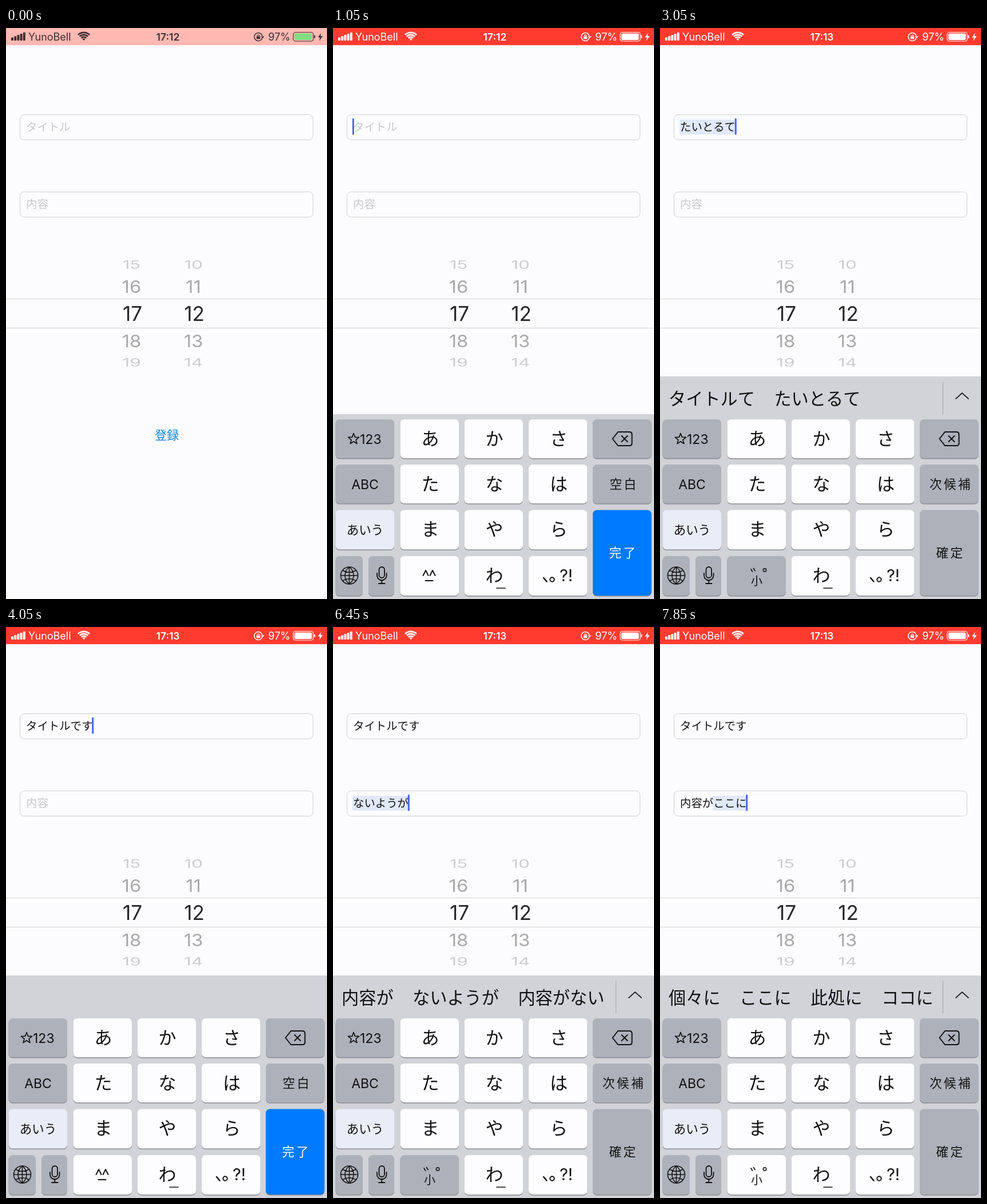
These frames come from a looping animation (561x998 px, 8 s). An HTML page with a canvas:

```html
<!DOCTYPE html>
<html lang="ja">
<head>
<meta charset="utf-8">
<title>入力フォーム</title>
<style>
html, body { margin: 0; width: 100%; height: 100%; overflow: hidden; background: #fcfcfe; }
canvas { display: block; width: 561px; height: 998px; }
</style>
</head>
<body>
<canvas id="stage" width="561" height="998"></canvas>
<script>
const ctx = document.getElementById('stage').getContext('2d');
const LOOP = 8000;
const FONT = 'Inter, "Noto Sans CJK JP", "Noto Sans CJK", sans-serif';
const PAPER = '#fcfcfe', GRAY = '#adb1ba', BOARD = '#d1d3d8', BLUE = '#007aff';
const COLS = [4.5, 117.5, 229.5, 342, 454], ROWS = [684, 763, 842.5, 923];
const KEY_W = 102.5, KEY_H = 69;
const KANA = ['あかさ', 'たなは', 'まやら'];

// [start, field, committed text, marked text, candidates]; null hides the bar
const STEPS = [
  [0, -1, '', '', null],
  [550, 0, '', '', null],
  [1600, 0, '', 'た', 'た 高い 楽しい ただ'],
  [1800, 0, '', 'たい', 'たい 大変 大切 タイ'],
  [2000, 0, '', 'たいと', 'タイトル タイトルです たいとる'],
  [2200, 0, '', 'たいとる', 'タイトル タイトルです たいとる'],
  [2650, 0, '', 'たいとるて', 'タイトルて たいとるて'],
  [3100, 0, '', 'たいとるで', 'タイトルで タイトルです'],
  [3550, 0, '', 'たいとるです', 'タイトルです たいとるです'],
  [3950, 0, 'タイトルです', '', ''],
  [4450, 1, '', '', ''],
  [5150, 1, '', 'な', 'な 何 ない 中 なる'],
  [5400, 1, '', 'ない', 'ない 無い 内容 内容は ナイ'],
  [5750, 1, '', 'ないよ', 'ないよ 内容 無いよ'],
  [6000, 1, '', 'ないよう', '内容 内容は ないよう'],
  [6200, 1, '', 'ないようか', '内容か ないようか 内容が'],
  [6400, 1, '', 'ないようが', '内容が ないようが 内容がない'],
  [7200, 1, '内容が', '', ''],
  [7400, 1, '内容が', 'こ', 'こ この これ 今回'],
  [7600, 1, '内容が', 'ここ', 'ここ 個々 ココ 此処'],
  [7800, 1, '内容が', 'ここに', '個々に ここに 此処に ココに']
];

const PRESSES = [
  ['た', 1500, 1600], ['あ', 1700, 1800], ['た', 1900, 2000], ['ら', 2100, 2250],
  ['た', 2500, 2650], ['小', 2850, 3200], ['さ', 3400, 3600],
  ['な', 5000, 5150], ['あ', 5300, 5450], ['や', 5600, 5750], ['あ', 5900, 6000],
  ['か', 6100, 6200], ['小', 6350, 6800],
  ['か', 7300, 7400], ['か', 7500, 7600], ['な', 7700, 7800]
];

const clamp = v => Math.min(1, Math.max(0, v));
const mix = (a, b, k) => `rgb(${a.map((v, i) => Math.round(v + (b[i] - v) * k))})`;

function text(str, x, y, size, color, { align = 'center', weight = 350, gap = 0 } = {}) {
  ctx.font = `${weight} ${size}px ${FONT}`;
  ctx.letterSpacing = gap + 'px';
  ctx.textAlign = align;
  ctx.fillStyle = color;
  ctx.fillText(str, x, y + size * 0.37);
}

function box(x, y, w, h, r, fill) {
  ctx.beginPath();
  ctx.roundRect(x, y, w, h, r);
  if (fill) {
    ctx.fillStyle = fill;
    ctx.fill();
  }
}

function stroke(path, color = '#111', width = 2) {
  ctx.strokeStyle = color;
  ctx.lineWidth = width;
  ctx.lineCap = ctx.lineJoin = 'round';
  ctx.stroke(new Path2D(path));
}

function fill(path, color) {
  ctx.fillStyle = color;
  ctx.fill(new Path2D(path));
}

function arc(x, y, r, from, to, color, width) {
  ctx.beginPath();
  ctx.arc(x, y, r, from, to);
  ctx.strokeStyle = color;
  ctx.lineWidth = width;
  ctx.lineCap = 'butt';
  ctx.stroke();
}

function statusBar(t) {
  const k = clamp(t / 350);
  const ink = mix([62, 48, 50], [255, 255, 255], k);
  ctx.fillStyle = mix([255, 184, 178], [255, 59, 48], k);
  ctx.fillRect(0, 0, 561, 30);
  for (let i = 0; i < 5; i++) {
    const h = 5.5 + i * 2.2;
    box(9 + i * 5.2, 22 - h, 4, h, 1, ink);
  }
  text('YunoBell', 39, 15.5, 18, ink, { align: 'left', weight: 400 });
  for (const r of [6.2, 10.2, 14.2]) arc(136, 22, r, -Math.PI * 0.75, -Math.PI * 0.25, ink, 2.7);
  fill('M136 22l-2.6-2.8q2.6-2 5.2 0z', ink);
  text(t < 2600 ? '17:12' : '17:13', 283, 15.5, 17.5, ink, { weight: 600 });

  arc(441, 15.5, 7, 0.25, Math.PI * 1.93, ink, 1.5);
  fill('M445.5 14.5h6l-3 3.8z', ink);
  box(437.8, 14.5, 6.4, 4.8, 1, ink);
  arc(441, 14.3, 2, Math.PI, 0, ink, 1.3);

  text('97%', 497, 15.5, 18, ink, { align: 'right', weight: 400 });
  box(502, 7.5, 35, 15.5, 4);
  ctx.strokeStyle = ink;
  ctx.lineWidth = 1.2;
  ctx.stroke();
  box(504, 9.5, 30.5, 11.5, 2.2, mix([130, 220, 130], [255, 255, 255], k));
  box(538.3, 12.5, 2, 5.5, 1, ink);
  fill('M551 8.5l-6 8h3.8l-1.4 6 6.1-8.2h-3.9z', ink);
}

function field(y, hint, value, marked, caret) {
  box(24.5, y + 0.5, 512, 44, 7, PAPER);
  ctx.strokeStyle = '#cfcfcf';
  ctx.lineWidth = 1;
  ctx.stroke();
  const size = 19.4, x = 35, cy = y + 21.5;
  const markX = x + value.length * size, end = markX + marked.length * size;
  if (marked) {
    ctx.fillStyle = '#e1e9fb';
    ctx.fillRect(markX - 1, y + 9, end - markX + 1, 26);
  }
  const all = value + marked;
  text(all || hint, x, cy, size, all ? '#111' : '#c8c8cc', { align: 'left' });
  if (caret > 0) {
    ctx.globalAlpha = caret;
    box(end - 1.2, y + 7, 3, 28.5, 1, '#4668e0');
    ctx.globalAlpha = 1;
  }
}

function picker() {
  // [offset, centre y, x scale, y scale, colour]
  const rows = [
    [-2, 413.5, 0.9, 0.57, '#cdccd0'], [-1, 451.5, 0.94, 0.87, '#a9a9aa'],
    [0, 499.5, 1, 1, '#26262b'],
    [1, 547, 0.94, 0.87, '#a9a9aa'], [2, 585, 0.9, 0.57, '#cdccd0']
  ];
  for (const [off, y, sx, sy, color] of rows) {
    for (const [base, x] of [[17, 221], [12, 329]]) {
      ctx.save();
      ctx.beginPath();
      ctx.rect(0, 406, 561, 185.5);
      ctx.clip();
      ctx.translate(x - (off ? 1.5 : 0), y);
      ctx.scale(sx, sy);
      text(String(base + off), 0, 0, 35, color, { weight: 400 });
      ctx.restore();
    }
  }
  ctx.fillStyle = '#d2d2cf';
  ctx.fillRect(0, 473, 561, 1);
  ctx.fillRect(0, 524, 561, 1);
}

function key(x, y, w, h, color) {
  box(x, y + 1.5, w, h, 7, '#898c92');
  box(x, y, w, h, 7, color);
}

function star(x, y, r) {
  let d = '';
  for (let i = 0; i < 10; i++) {
    const a = i * Math.PI / 5 - Math.PI / 2, q = i % 2 ? r * 0.42 : r;
    d += `${i ? 'L' : 'M'}${x + q * Math.cos(a)} ${y + q * Math.sin(a)}`;
  }
  stroke(d + 'Z', '#111', 1.7);
}

function candidates(list) {
  ctx.fillStyle = BOARD;
  ctx.fillRect(0, 609, 561, 67);
  if (!list) return;
  ctx.save();
  ctx.beginPath();
  ctx.rect(0, 609, 495, 67);
  ctx.clip();
  let x = 15;
  for (const word of list.split(' ')) {
    text(word, x, 648, 30.2, '#111', { align: 'left' });
    x += word.length * 30.2 + 33.4;
  }
  ctx.restore();
  ctx.fillStyle = '#a2a4a9';
  ctx.fillRect(494, 618, 1, 57);
  stroke('M517 648l11-10 11 10', '#222', 1.7);
}

function sideKeys(composing) {
  for (const row of [0, 1]) {
    for (const col of [0, 4]) key(COLS[col], ROWS[row], KEY_W, KEY_H - 1, GRAY);
  }
  star(36, 718.5, 10);
  text('123', 47, 718.5, 23, '#111', { align: 'left', weight: 400 });
  text('ABC', 56, 797.5, 23, '#111', { weight: 400 });
  key(COLS[0], ROWS[2], KEY_W, KEY_H, '#e9edf8');
  text('あいう', 56, 877, 21.5, '#111');

  key(4.5, ROWS[3], 47.5, KEY_H, GRAY);
  stroke('M13.5 957a15 15 0 1 0 30 0a15 15 0 1 0-30 0M13.5 957h30M28.5 942v30' +
    'M28.5 942c-10 8-10 22 0 30M28.5 942c10 8 10 22 0 30M17 948q11.5 7 23 0M17 966q11.5-7 23 0', '#111', 1.5);
  key(62, ROWS[3], 45, KEY_H, GRAY);
  box(80.5, 942, 9.5, 19, 4.8);
  ctx.strokeStyle = '#111';
  ctx.lineWidth = 1.8;
  ctx.stroke();
  stroke('M77 953v4a8.2 8.2 0 0 0 16.5 0v-4M85.2 965.5v5M80 971h10.5', '#111', 1.8);

  stroke('M498 706h20q4.500 0 4.500 4.500v15q0 4.500-4.500 4.500h-20l-9.500-12z' +
    'M504.500 713l10 10M514.500 713l-10 10', '#111', 2);
  text(composing ? '次候補' : '空白', 508.5, 797.5, 21.5, '#111', { gap: 3.5 });
  key(COLS[4], ROWS[2], KEY_W, 149.5, composing ? GRAY : BLUE);
  text(composing ? '確定' : '完了', 507.5, 917.5, 21.5, composing ? '#111' : '#fff', { gap: 3.5 });
}

function keyboard(t, state) {
  const [, , , marked, list] = state;
  const rise = 1 - Math.pow(1 - clamp((t - 550) / 450), 3.5);
  const shade = name => PRESSES.some(([k, a, b]) => k === name && t >= a && t < b) ? GRAY : '#fdfdff';
  ctx.save();
  ctx.translate(0, 324 * (1 - rise));
  if (list !== null) candidates(list);
  ctx.fillStyle = BOARD;
  ctx.fillRect(0, 675, 561, 323);
  sideKeys(marked !== '');

  KANA.forEach((row, r) => [...row].forEach((kana, c) => {
    const x = COLS[c + 1], y = ROWS[r];
    key(x, y, KEY_W, r < 2 ? KEY_H - 1 : KEY_H, shade(kana));
    text(kana, x + 52.5, y + 33.5, 31, '#111');
  }));

  const y = ROWS[3];
  key(COLS[1], y, KEY_W, KEY_H, shade('小'));
  if (marked) {
    text('小', 169, 966.5, 20, '#111');
    stroke('M159 946l2.500 4M163.500 944.500l2.500 4', '#111', 1.7);
    arc(183, 947.5, 2.7, 0, Math.PI * 2, '#111', 1.5);
  } else {
    stroke('M157.500 957l4.500-9 4.500 9M169.500 957l4.500-9 4.500 9M161.500 966h13', '#111', 1.9);
  }
  key(COLS[2], y, KEY_W, KEY_H, shade('わ'));
  text('わ', 282, 957, 31, '#111');
  stroke('M286 979h15', '#111', 1.7);
  key(COLS[3], y, KEY_W, KEY_H, shade('、'));
  stroke('M368 961l5.500 6.500', '#111', 2.5);
  arc(383, 964, 3.7, 0, Math.PI * 2, '#111', 2);
  text('?!', 396, 956.5, 29, '#111', { align: 'left', weight: 400 });
  ctx.restore();
}

function draw(t) {
  const state = STEPS.findLast(s => t >= s[0]);
  const [, active, value, marked] = state;
  const caret = t < 1500 ? 1 - clamp((t - 1150) / 200) : 1;
  ctx.fillStyle = PAPER;
  ctx.fillRect(0, 0, 561, 998);
  statusBar(t);
  const first = active === 0, second = active === 1;
  field(151, 'タイトル', second ? 'タイトルです' : value, first ? marked : '', first ? caret : 0);
  field(286, '内容', second ? value : '', second ? marked : '', second ? caret : 0);
  picker();
  text('登録', 281, 711, 21, '#0f84e2');
  if (t >= 550) keyboard(t, state);
}

const start = performance.now();
function frame(now) {
  draw(Math.max(0, now - start) % LOOP);
  requestAnimationFrame(frame);
}
requestAnimationFrame(frame);
</script>
</body>
</html>
```
